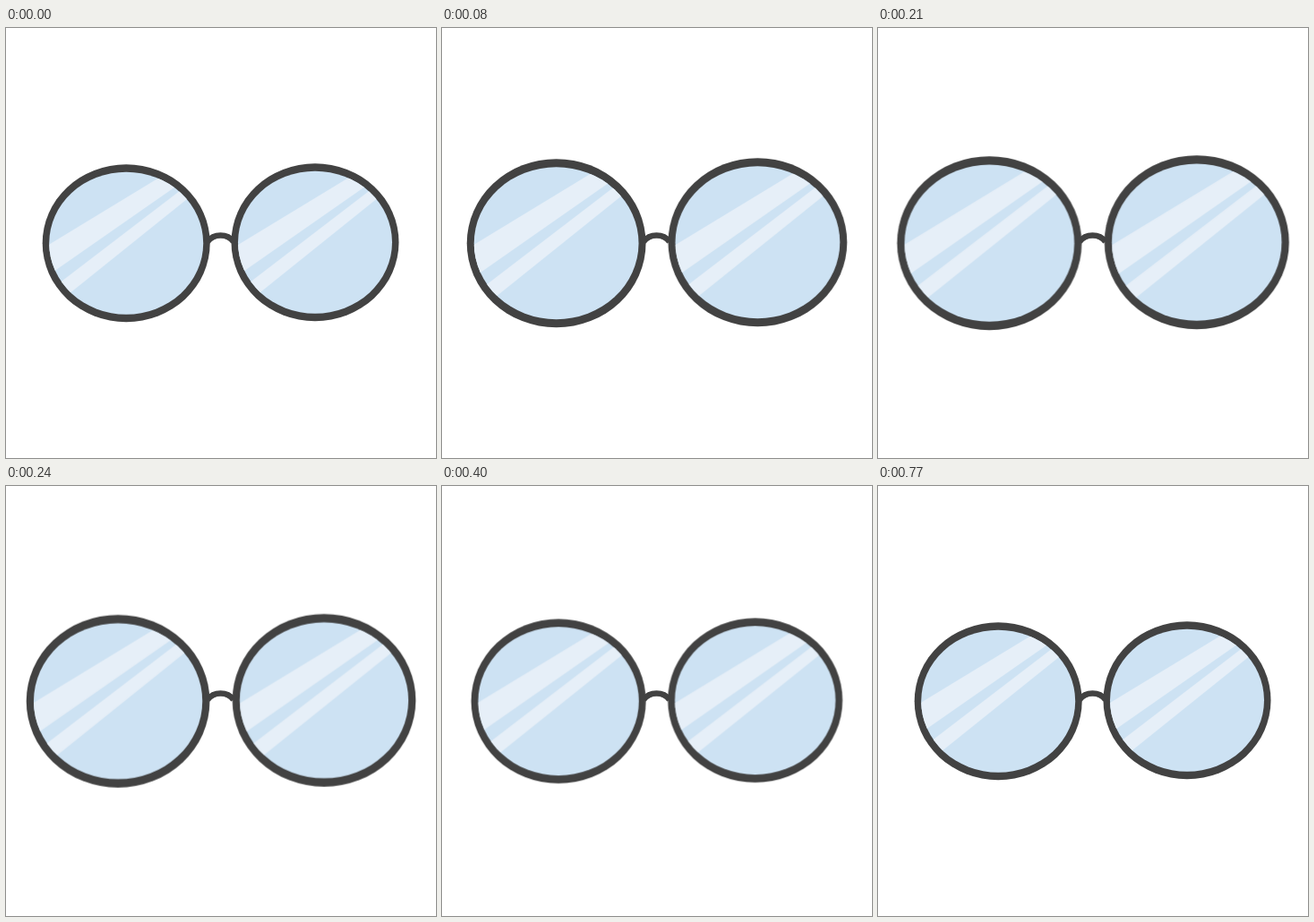
An HTML page for the animation above (0.96 s loop, 480 by 480 pixels).

```html
<!DOCTYPE html>
<html lang="en">
<head>
<meta charset="utf-8">
<title>Glasses</title>
<style>
  html, body { margin: 0; width: 100%; height: 100%; overflow: hidden; background: #fff; }
  svg { display: block; width: 100vw; height: 100vh; }
  .rim { fill: #424242; }
  .bridge { fill: none; stroke: #424242; stroke-width: 6.5; }
  .glass { fill: #cde2f3; }
  .shine { fill: #e6eff8; transform: translateY(var(--drop, 0px)); }
  /* each lens grows away from a point near the bridge */
  #left { transform-origin: 231px 240.2px; }
  #right { transform-origin: 239px 239.2px; --drop: 1.5px; }
</style>
</head>
<body>
<svg viewBox="0 0 480 480">
  <defs>
    <clipPath id="pane"><ellipse rx="86" ry="79.5"/></clipPath>
    <g id="lens">
      <ellipse class="rim" rx="93.5" ry="88"/>
      <ellipse class="glass" rx="86" ry="79.5"/>
      <g clip-path="url(#pane)">
        <g class="shine">
          <path d="M-92 5 L43 -77 L72 -75 L-92 39.4Z"/>
          <path d="M-87 54 L71 -67 L80 -59 L-77 67Z"/>
        </g>
      </g>
    </g>
  </defs>
  <path class="bridge" d="M225 238.5 C229 233 233.5 231.5 239.5 231.5 S250 233 254 238.5"/>
  <g id="left"><use href="#lens" x="134.2" y="240.2"/></g>
  <g id="right"><use href="#lens" x="345" y="239.2"/></g>
</svg>
<script>
  const LOOP = 960, STEP = 80, PEAK = 160, END = 480, GROWTH = 0.102;

  // Quick swell up to the peak, slower fall back to rest.
  function scaleAt(t) {
    const away = t < PEAK
      ? (1 - t / PEAK) ** 1.6
      : Math.min(1, (t - PEAK) / (END - PEAK)) ** 1.9;
    return 1 + GROWTH * (1 - away);
  }

  const frames = [];
  for (let t = 0; t <= LOOP; t += STEP) {
    frames.push({ offset: t / LOOP, transform: `scale(${scaleAt(t)})`, easing: 'steps(1, end)' });
  }

  for (const id of ['left', 'right']) {
    document.getElementById(id).animate(frames, { duration: LOOP, iterations: Infinity });
  }
</script>
</body>
</html>
```
